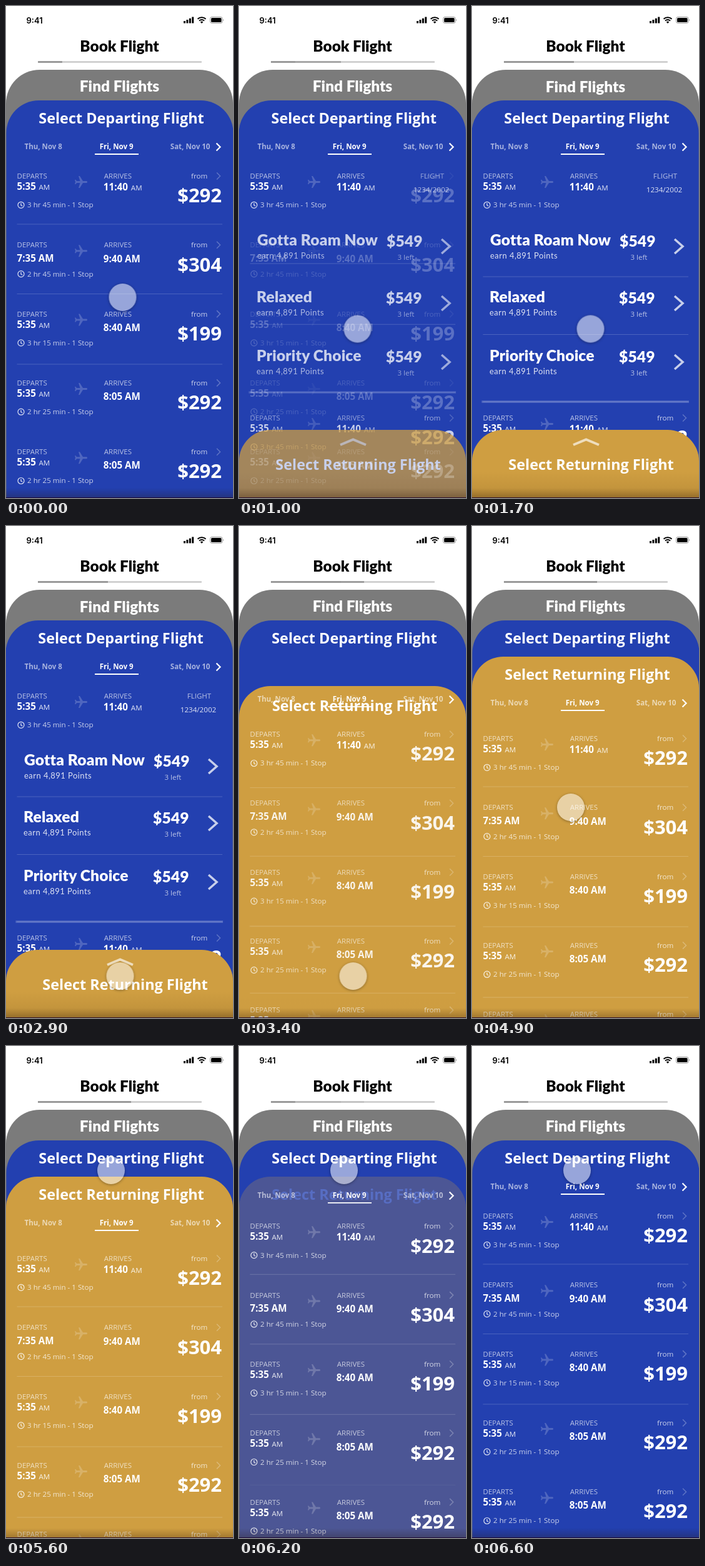
Write an HTML page that moves like this. It is 363 px wide and 787 px high and loops after 6900 ms.

```html
<!DOCTYPE html>
<html lang="en">
<head>
<meta charset="utf-8">
<title>Book Flight</title>
<style>
  /* progress of the three screen changes: list to fares, fares to return, return to list */
  @property --fares { syntax: "<number>"; inherits: true; initial-value: 0; }
  @property --back { syntax: "<number>"; inherits: true; initial-value: 0; }
  @property --reset { syntax: "<number>"; inherits: true; initial-value: 0; }

  html, body { margin: 0; width: 100%; height: 100%; overflow: hidden; background: #fff; }
  #stage {
    position: relative; width: 363px; height: 787px; overflow: hidden;
    animation: fares 6.9s step-end infinite, back 6.9s step-end infinite, reset 6.9s step-end infinite;
  }
  svg { display: block; }
  @keyframes fares {
    0% { --fares: 0; }
    13.04% { --fares: .4; }
    14.49% { --fares: .75; }
    15.94% { --fares: .98; }
    24.63%, 100% { --fares: 1; }
  }
  @keyframes back {
    0% { --back: 0; }
    46.37% { --back: .42; }
    47.82% { --back: .76; }
    49.27% { --back: .9; }
    50.72% { --back: .96; }
    52.17% { --back: .985; }
    53.62%, 100% { --back: 1; }
  }
  @keyframes reset {
    0% { --reset: 0; }
    88.4% { --reset: .42; }
    89.85% { --reset: .76; }
    91.3% { --reset: .9; }
    92.75% { --reset: .96; }
    94.2% { --reset: .985; }
    95.65%, 100% { --reset: 1; }
  }

  .on-fares { opacity: calc(var(--fares) * (1 - var(--back))); }
  .on-list { opacity: calc(1 - var(--fares) + var(--back)); }
  .on-sheet { opacity: calc(var(--fares) * (1 - var(--reset))); }
  .on-back { opacity: calc(var(--back) * (1 - var(--reset))); }
  #sheet { transform: translateY(calc(-469px * var(--back))); }
  #sheetTitle { transform: translate(calc(-6px * var(--back)), calc(-27px * var(--back))); }
  #hint { opacity: calc(.65 * (1 - var(--back))); }
  #tabs { transform: translateY(calc(58px * var(--back) * (1 - var(--reset)))); }
  #list { transform: translateY(calc(68px * var(--back) * (1 - var(--reset)))); }
  #find { transform: translateY(calc(1px * var(--fares) * (1 - var(--back)))); }
  #depart { transform: translateX(calc(-1px * var(--fares) * (1 - var(--back)))); }
  .rule { transform: translateY(calc(var(--drop) * var(--fares) * (1 - var(--back)))); }

  text { fill: #fff; font-family: "Open Sans", sans-serif; }
  .label { font-size: 11.5px; fill-opacity: .68; }
  .note { font-size: 11.6px; fill-opacity: .76; }
  .time { font-size: 15.2px; font-weight: 700; }
  .unit { font-size: 11.6px; fill-opacity: .85; }
  .price { font-size: 31px; font-weight: 700; text-anchor: end; }
  .title { font-size: 23.4px; font-weight: 700; text-anchor: middle; }
  .head { font: 900 24.4px Lato, sans-serif; text-anchor: middle; }
  .fare { font: 900 24.6px Lato, sans-serif; letter-spacing: .15px; }
  .earn { font: 400 13px Lato, sans-serif; letter-spacing: .45px; fill-opacity: .85; }
  .date { font-size: 11.5px; font-weight: 700; fill-opacity: .6; }
  .clock { font: 600 13px Inter, sans-serif; }
  .mid { text-anchor: middle; }
  .dark { fill: #000; }
  .line { fill: none; stroke: #fff; }

  #touch {
    position: absolute; left: -22px; top: -22px; width: 44px; height: 44px; border-radius: 50%;
    background: rgba(255, 255, 255, .53); box-shadow: 0 1px 4px rgba(0, 0, 0, .35);
    animation: touch 6.9s step-end infinite;
  }
  @keyframes touch {
    0% { transform: translate(186.5px, 466px); }
    1.44% { transform: translate(187px, 478px); }
    2.89% { transform: translate(188px, 497px); }
    4.34% { transform: translate(189px, 511px); }
    5.79% { transform: translate(189.5px, 516.5px); }
    33.33% { transform: translate(193px, 530px); }
    34.78% { transform: translate(197px, 562px); }
    36.23% { transform: translate(196px, 607px); }
    37.68% { transform: translate(187px, 652px); }
    39.13% { transform: translate(177px, 690px); }
    40.57% { transform: translate(175px, 712px); }
    42.02% { transform: translate(182.5px, 720px); }
    66.66% { transform: translate(186px, 702px); }
    68.11% { transform: translate(188px, 645px); }
    69.56% { transform: translate(177px, 555px); }
    71.01% { transform: translate(158px, 450px); }
    72.46% { transform: translate(144px, 355px); }
    73.91% { transform: translate(142px, 287px); }
    75.36% { transform: translate(156px, 243px); }
    76.81% { transform: translate(159px, 226px); }
    78.26% { transform: translate(163px, 211px); }
    79.71% { transform: translate(166px, 202px); }
    81.15%, 100% { transform: translate(168px, 199px); }
  }
</style>
</head>
<body>
<div id="stage">
  <svg width="363" height="787" viewBox="0 0 363 787">
    <defs>
      <linearGradient id="shade" x2="0" y2="1">
        <stop offset="0" stop-color="#2a1400" stop-opacity="0"/>
        <stop offset="1" stop-color="#2a1400" stop-opacity=".28"/>
      </linearGradient>
      <path id="plane" transform="rotate(90) translate(-11.5 -12)" fill="#fff" fill-opacity=".2"
        d="M21 16v-2l-8-5V3.5C13 2.67 12.33 2 11.5 2S10 2.67 10 3.5V9l-8 5v2l8-2.5V19l-2 1.5V22l3.5-1 3.5 1v-1.5L13 19v-5.5l8 2.5z"/>
      <g id="dial" class="line" stroke-width="1.2"><circle r="5"/><path d="M0-3V.3L2.3 1.6"/></g>
    </defs>

    <!-- status bar and heading -->
    <text class="clock dark" x="32.5" y="28">9:41</text>
    <path d="M284 24h3v3.5h-3zM288.4 22h3v5.5h-3zM292.8 19.8h3v7.7h-3zM297.2 17.5h3v10h-3z"/>
    <path d="M306.5 20.8a9.3 9.3 0 0 1 13 0M308.9 23.6a5.8 5.8 0 0 1 8.2 0" fill="none" stroke="#000" stroke-width="2"/>
    <path d="M313 28l-2.3-2.5a3.3 3.3 0 0 1 4.6 0z"/>
    <rect x="326.5" y="17.5" width="19.5" height="10" rx="2.8" fill="none" stroke="#000" stroke-opacity=".4"/>
    <rect x="328" y="19" width="16.5" height="7" rx="1.5"/>
    <path d="M347 20.8q1.8 1.7 0 3.4z" fill-opacity=".5"/>
    <text class="head dark" x="181.5" y="73">Book Flight</text>
    <g transform="translate(51 88)">
      <rect width="262" height="3" rx="1" fill="#d1d1d1"/>
      <rect class="on-sheet" width="112" height="3" fill="#9a9a9a"/>
      <rect class="on-back" width="149" height="3" fill="#9a9a9a"/>
      <rect width="39" height="3" rx="1" fill="#9a9a9a"/>
    </g>

    <!-- stacked cards -->
    <rect y="102" width="363" height="740" rx="54" fill="#7b7b7b"/>
    <text id="find" class="head" x="181.5" y="136.5">Find Flights</text>
    <g id="depart">
      <rect x=".5" y="151" width="363" height="740" rx="52" fill="#2340b0"/>
      <text class="title" x="184.5" y="188">Select Departing Flight</text>
    </g>
    <g id="fares" class="on-fares"></g>
    <g class="on-sheet">
      <g id="sheet">
        <rect y="678" width="363" height="740" rx="50" fill="#cf9e41"/>
        <path id="hint" class="line" d="M162 702l20.5-8.5 20.5 8.5" stroke-width="4"/>
        <text id="sheetTitle" class="title" x="190.5" y="742">Select Returning Flight</text>
      </g>
    </g>
    <rect class="on-fares" y="745" width="363" height="42" fill="url(#shade)" fill-opacity=".4"/>

    <g id="tabs">
      <text class="date" x="29.5" y="229">Thu, Nov 8</text>
      <text class="date" x="149.8" y="229" style="fill-opacity:1">Fri, Nov 9</text>
      <text class="date" x="262.8" y="229">Sat, Nov 10</text>
      <path class="line" d="M142 237h70" stroke-width="1.8"/>
      <path class="line" d="M336.5 219.5l6 6-6 6" stroke-width="2.2"/>
    </g>
    <g id="list"></g>
    <rect y="771" width="363" height="16" fill="url(#shade)"/>
    <rect y="786" width="363" height="1" fill="#18002c" fill-opacity=".85"/>
  </svg>
  <div id="touch"></div>
</div>
<script>
  const text = (cls, x, y, s) => `<text class="${cls}" x="${x}" y="${y}">${s}</text>`;
  const at = (y, inner, cls = "") => `<g class="${cls}"><g transform="translate(0 ${y})">${inner}</g></g>`;

  // a time is either all bold or has a small AM beside it
  const time = (x, y, s, small) => small
    ? text("time", x, y, s) + text("unit", x + (s.length > 4 ? 44 : 35), y, "AM")
    : text("time", x, y + 4.3, s + " AM");

  const trip = (dep, arr, span, smallDep, smallArr) =>
    text("label", 17.5, 4, "DEPARTS") + text("label", 156.8, 4, "ARRIVES") +
    time(17.5, 22, dep, smallDep) + time(155.8, 23, arr, smallArr) +
    `<use href="#plane" transform="translate(120 9.5)"/>` +
    `<use href="#dial" transform="translate(24 46.3)" opacity=".85"/>` +
    text("note", 34, 50.3, span + " - 1 Stop");

  const cost = price =>
    text("note", 296, 4, "from") + text("price", 345, 42.3, price) +
    `<path class="line" d="M337-5.5l5.5 5.5-5.5 5.5" stroke-width="1.5" opacity=".27"/>`;

  const flights = [
    ["5:35", "11:40", "3 hr 45 min", true, true, "$292"],
    ["7:35", "9:40", "2 hr 45 min", false, false, "$304"],
    ["5:35", "8:40", "3 hr 15 min", true, false, "$199"],
    ["5:35", "8:05", "2 hr 25 min", true, false, "$292"],
    ["5:35", "8:05", "2 hr 25 min", true, false, "$292"]
  ];
  const rule = (y, drop, extra = "") =>
    `<g class="rule" style="--drop:${drop}px"><path class="line" d="M17.5 ${y}H346" opacity=".18"/>${extra}</g>`;

  const rows = flights.map((f, i) => {
    const y = 272 + i * 110.3;
    return at(y, trip(...f), i ? "on-list" : "") + at(y, cost(f[5]), "on-list");
  });
  const thick = `<path class="line on-fares" d="M15.5 573H347" stroke-width="3.5" stroke-opacity=".22"/>`;
  document.getElementById("list").innerHTML = rows.join("") +
    rule(349, 84) + rule(460.5, 65) + rule(573, 60, thick) +
    `<path class="line on-back" d="M17.5 686H346" stroke-opacity=".2"/>`;

  const offer = ([name, x, y]) => at(y,
    text("fare", x, 0, name) + text("fare", x + 207, 2, "$549") +
    text("earn", x, 21, "earn 4,891 Points") + text("label", 253.5, 23, "3 left") +
    `<path class="line" d="M324-10l13 11.5L324 13" stroke-width="3.5" opacity=".75"/>`);
  document.getElementById("fares").innerHTML =
    text("label mid", 309, 276, "FLIGHT") +
    text("unit mid", 307.5, 298, "1234/2002") +
    [["Gotta Roam Now", 29, 383], ["Relaxed", 28, 474], ["Priority Choice", 28, 568]].map(offer).join("") +
    at(659, trip(...flights[0]) + cost("$292"));
</script>
</body>
</html>
```
